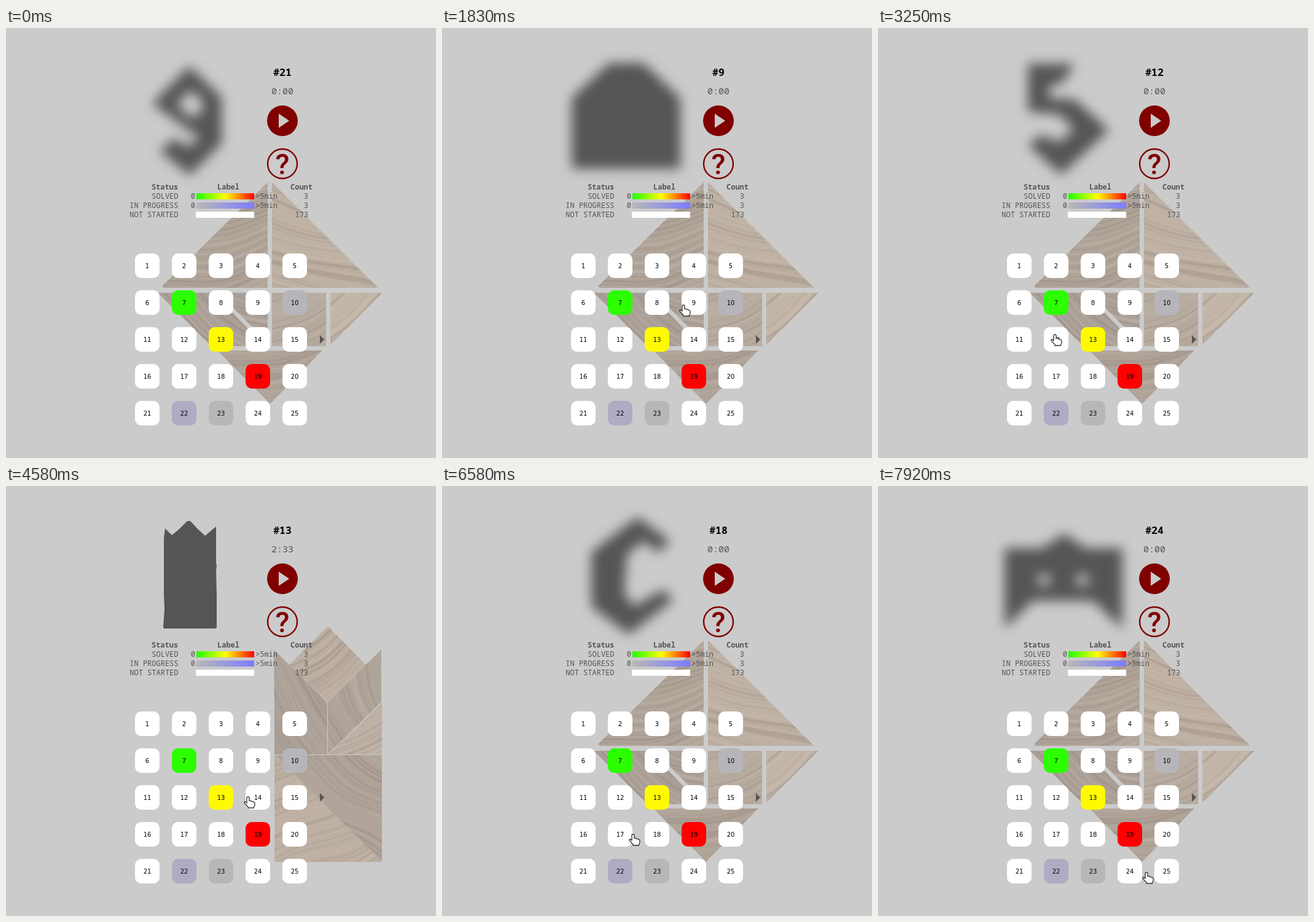
These frames come from a looping animation (700x700 px, 8000 ms). An HTML page:

```html
<!DOCTYPE html>
<html lang="en">
<head>
<meta charset="utf-8">
<title>Puzzle menu</title>
<style>
  html, body { margin: 0; width: 100%; height: 100%; overflow: hidden; background: #cbcbcb; }
  svg { display: block; width: 100vw; height: 100vh; }
  text { font-family: "Noto Sans Mono", "DejaVu Sans Mono", monospace; fill: #555; }
  .table { font-size: 12px; }
  .bold { font-weight: 700; }
  .mid { text-anchor: middle; }
  .end { text-anchor: end; }
  #title { font-size: 16.5px; fill: #000; }
  #time { font-size: 15px; }
  .num { font: 10px "DejaVu Sans", sans-serif; fill: #000; }
  .help { font: 500 47px Roboto, "Open Sans", sans-serif; fill: #800000; }
</style>
</head>
<body>
<svg id="stage" viewBox="0 0 700 700">
  <defs>
    <filter id="soft" filterUnits="userSpaceOnUse" x="150" y="0" width="300" height="300">
      <feGaussianBlur stdDeviation="9.5"/>
    </filter>
    <linearGradient id="solved">
      <stop offset="0" stop-color="#1eff00"/><stop offset=".5" stop-color="#ffff00"/><stop offset="1" stop-color="#ff0000"/>
    </linearGradient>
    <linearGradient id="progress">
      <stop offset="0" stop-color="#b8b8b8"/><stop offset="1" stop-color="#7c7cff"/>
    </linearGradient>
  </defs>
  <g id="boards"></g>
  <path id="shape" fill="#555" fill-rule="evenodd"/>
  <text id="title" class="bold mid" x="450" y="78"></text>
  <text id="time" class="mid" x="450" y="108"></text>
  <circle cx="450" cy="151" r="25" fill="#800000"/>
  <path d="M444 139.5L461 151L444 162.5Z" fill="#cbcbcb"/>
  <circle cx="450" cy="221" r="24" fill="none" stroke="#800000" stroke-width="2.4"/>
  <text class="help mid" x="450" y="238">?</text>
  <g class="table">
    <text class="bold mid" x="258.5" y="263">Status</text>
    <text class="bold mid" x="362" y="263">Label</text>
    <text class="bold mid" x="481" y="263">Count</text>
    <g class="end">
      <text x="280.5" y="278">SOLVED</text>
      <text x="280.5" y="293">IN PROGRESS</text>
      <text x="280.5" y="308">NOT STARTED</text>
      <text x="308" y="278">0</text>
      <text x="308" y="293">0</text>
      <text x="492" y="278">3</text>
      <text x="492" y="293">3</text>
      <text x="492" y="308">173</text>
    </g>
    <text x="406" y="278">&gt;5min</text>
    <text x="406" y="293">&gt;5min</text>
  </g>
  <rect x="310" y="269" width="94" height="10" fill="url(#solved)"/>
  <rect x="310" y="284" width="94" height="10" fill="url(#progress)"/>
  <rect x="309" y="299" width="95" height="10" fill="#fff"/>
  <path d="M511 500L518 507L511 514Z" fill="#5b534d"/>
  <g id="tiles"></g>
  <path id="hand" fill="#fff" stroke="#333" stroke-width="1.3" stroke-linejoin="round"
    d="M-2 2Q-2 0 0 0T2 2V6.5Q5 5.5 5.5 7.5Q8 6.5 8.5 8.5Q11 8 11 10.5V13Q11 15 9.5 16.5V18H0V16.5L-5.5 10.5Q-7 8.5-5 8Q-3.5 8-2 10Z"/>
</svg>
<script>
const NS = "http://www.w3.org/2000/svg";
const $ = id => document.getElementById(id);

function add(parent, tag, attrs, text) {
  const el = document.createElementNS(NS, tag);
  for (const key in attrs) el.setAttribute(key, attrs[key]);
  if (text !== undefined) el.textContent = text;
  parent.appendChild(el);
  return el;
}

function random(seed) {
  return () => {
    seed = (seed * 16807) % 2147483647;
    return seed / 2147483647;
  };
}

// Wooden pieces: outline, base colour, grain angle
const wood = {
  plain: [
    ["M426 251V423H256L254 420Z", "#b0a499", -12],
    ["M433 251L606 423H433Z", "#beb1a4", 12],
    ["M247 431H336L423 518H334Z", "#a99e95", 38],
    ["M345 431H426V512Z", "#aca198", 20],
    ["M433 431H521V518H433Z", "#b7aba0", -25],
    ["M528 431H613L528 516Z", "#c1b4a7", -38],
    ["M344 525H515L430 612Z", "#b0a499", -10]
  ],
  7: [
    ["M437 350L525 262L612 350Z", "#bdb0a3", 15],
    ["M437 351H612L437 612Z", "#afa399", -40],
    ["M612 351V612H438Z", "#b9ada1", 30]
  ],
  13: [
    ["M524 228L586 291L524 352L461 291Z", "#bbada0", -35],
    ["M436 266L523 352V437H437Z", "#aba097", 60],
    ["M611 266V352L524 437V352Z", "#aea399", 70],
    ["M612 353V437H525Z", "#beb1a5", -30],
    ["M437 438H612V612Z", "#aea299", 35],
    ["M437 438L612 612H437Z", "#bdb0a3", -25]
  ],
  19: [
    ["M440 94H612L526 180Z", "#bfb1a3", 8],
    ["M438 95L526 181H438Z", "#aca198", 40],
    ["M438 182H611L525 267H438Z", "#c1b4a6", -8],
    ["M438 268H611L438 440Z", "#b0a499", -22],
    ["M525 354H612L525 440H439Z", "#b2a69b", -32],
    ["M438 441H610L438 612Z", "#bdb0a4", 76]
  ]
};

const boards = {};
for (const name in wood) {
  const board = boards[name] = add($("boards"), "g", {});
  wood[name].forEach(([d, fill, angle], i) => {
    const rnd = random(name.length * 131 + i * 977 + 7);
    const id = "clip-" + name + i;
    add(add(board, "clipPath", { id }), "path", { d });
    const piece = add(board, "g", { "clip-path": `url(#${id})` });
    const outline = add(piece, "path", { d, fill });
    const box = outline.getBBox();
    const grain = add(piece, "g", {
      fill: "none",
      transform: `translate(${box.x + box.width / 2} ${box.y + box.height / 2}) rotate(${angle})`
    });
    const bend = 12 + 24 * rnd(), phase = 6 * rnd();
    for (let row = -20; row <= 20; row++) {
      const offset = row * 7 + 4 * rnd();
      let line = "";
      for (let x = -180; x <= 180; x += 12) {
        const y = offset + bend * Math.exp(-((x / 70) ** 2)) + 4 * Math.sin(x / 36 + phase + row * .15);
        line += (line ? "L" : "M") + x + " " + y.toFixed(1);
      }
      add(grain, "path", {
        d: line,
        stroke: rnd() < .55 ? "#81736a" : "#d2c5b7",
        "stroke-width": (1 + 4 * rnd()).toFixed(1),
        opacity: (.08 + .18 * rnd()).toFixed(2)
      });
    }
  });
}

// Outlines of the puzzles, solved ones are drawn sharp
const shapes = {
  7: "M257 130L300 87L343 130V230H257Z",
  9: "M211 229V114L272 57H328L388 114V229Z",
  12: "M244 58H320L302 88L278 96V114L320 116L376 166L298 239L244 190L266 174L295 186L319 165L296 141L244 136Z",
  13: "M259 69L270 80L282 70L295 57H300L312 70L324 81L342 66V125L343 130L342 137L343 180V230L341 232H257L256 229L258 200L257 178V85Z",
  18: "M318 50L372 90L352 108L327 90L301 112L297 175L312 196L360 168L376 186L304 242L243 196V108Z",
  19: "M277 80L336 79L312 103L315 107L334 108L315 131L335 134L311 158L336 160L314 184L334 188L308 212L276 245Z",
  21: "M238 123L298 62L351 112V188L299 240L250 200L274 180L297 194L316 176L302 170ZM278 123L300 146L319 138V116L300 102Z",
  24: "M206 101H268L303 77L338 101H398V232L350 187H252L206 232ZM270 141L283 153L270 165L257 153ZM333 141L346 153L333 165L320 153Z"
};
const times = { 7: "0:07", 10: "0:18", 13: "2:33", 19: "5:04", 22: "1:12", 23: "0:04" };
const colors = { 7: "#2bff00", 10: "#b6b6ba", 13: "#fffa00", 19: "#ff0000", 22: "#aeacc3", 23: "#b7b7b7" };

function outline(n) {
  if (shapes[n]) return shapes[n];
  const rnd = random(n * 4177 + 11), corners = 6 + n % 3;
  let d = "";
  for (let i = 0; i < corners; i++) {
    const a = 2 * Math.PI * (i + .5 * rnd()) / corners, r = 48 + 44 * rnd();
    d += (i ? "L" : "M") + (300 + r * Math.cos(a)).toFixed(1) + " " + (148 + r * Math.sin(a)).toFixed(1);
  }
  return d + "Z";
}

for (let n = 1; n <= 25; n++) {
  const x = 230 + 60 * ((n - 1) % 5), y = 387 + 60 * Math.floor((n - 1) / 5);
  add($("tiles"), "rect", { x: x - 20, y: y - 20, width: 40, height: 40, rx: 10, fill: colors[n] || "#fff" });
  add($("tiles"), "text", { class: "num mid", x, y: y + 4 }, n);
}

// Pointer path: step, x, y
const LOOP = 8000, STEPS = 96;
const route = [
  [3, 27, 582], [8, 222, 400], [12, 330, 386], [16, 462, 386], [18, 474, 440], [21, 410, 449], [22, 393, 451],
  [28, 291, 447], [36, 291, 447], [38, 289, 488], [39, 288, 499], [43, 290, 565], [44, 290, 565], [47, 292, 626],
  [48, 345, 626], [51, 360, 510], [54, 360, 510], [55, 394, 506], [58, 470, 508], [61, 472, 566], [64, 428, 566],
  [65, 416, 565], [68, 410, 567], [72, 410, 567], [77, 350, 568], [78, 350, 568], [79, 311, 567], [82, 230, 570],
  [85, 167, 600], [88, 167, 622], [89, 170, 625], [95, 437, 629]
];

function pointer(step) {
  if (step < route[0][0]) return null;
  const i = Math.max(1, route.findIndex(p => p[0] >= step));
  const [s0, x0, y0] = route[i - 1], [s1, x1, y1] = route[i];
  const f = (step - s0) / (s1 - s0);
  return [x0 + (x1 - x0) * f, y0 + (y1 - y0) * f];
}

function tileAt([x, y]) {
  const col = Math.round((x - 230) / 60), row = Math.round((y - 387) / 60);
  const inside = Math.abs(x - 230 - 60 * col) <= 20 && Math.abs(y - 387 - 60 * row) <= 20;
  return inside && col >= 0 && col < 5 && row >= 0 && row < 5 ? row * 5 + col + 1 : 0;
}

// The panel follows the pointer one step late and keeps the last tile
const hovered = [21];
for (let s = 1; s < STEPS; s++) {
  const p = pointer(s - 1);
  hovered[s] = p && tileAt(p) || hovered[s - 1];
}

function show(n) {
  const board = boards[n] ? String(n) : "plain";
  for (const name in boards) boards[name].style.display = name === board ? "" : "none";
  $("shape").setAttribute("d", outline(n));
  $("shape").setAttribute("filter", boards[n] ? "none" : "url(#soft)");
  $("title").textContent = "#" + n;
  $("time").textContent = times[n] || "0:00";
}

let lastStep = -1, lastTile = 0;
const start = performance.now();

function draw() {
  const t = (performance.now() - start) % LOOP;
  const step = Math.floor((t + 4) * STEPS / LOOP) % STEPS;
  if (step !== lastStep) {
    lastStep = step;
    const p = pointer(step);
    $("hand").style.display = p ? "" : "none";
    if (p) $("hand").setAttribute("transform", `translate(${p[0].toFixed(1)} ${p[1].toFixed(1)})`);
    if (hovered[step] !== lastTile) show(lastTile = hovered[step]);
  }
  requestAnimationFrame(draw);
}
draw();
</script>
</body>
</html>
```
